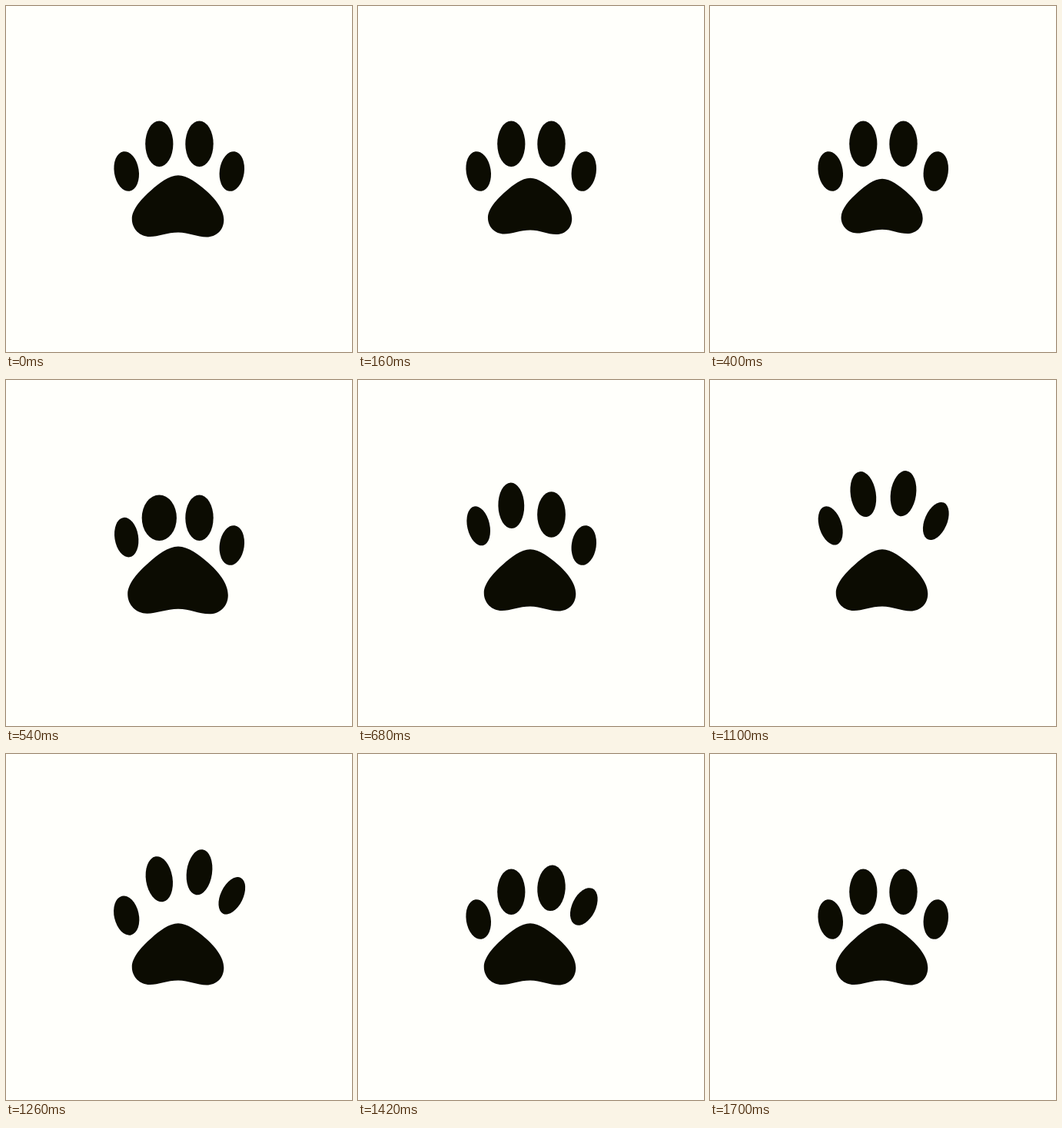
Recreate the animation shown at these times as an HTML page. Size 450 by 450 pixels, loop 1720 ms.

```html
<!DOCTYPE html>
<html>
<head>
<meta charset="utf-8">
<title>Paw</title>
<style>
  html, body { margin: 0; width: 100%; height: 100%; overflow: hidden; background: #fffffb; }
  svg { display: block; width: 100%; height: 100%; fill: #0c0c02; }
</style>
</head>
<body>
<svg id="stage" viewBox="0 0 450 450">
  <path id="pad" d="M224 220.3C236 220.3 249 230.5 259.5 239.5C271.5 250 283.3 264 283.3 278C283.3 292 273 300.5 261 300.5C248 300.5 238 294.5 224 294.5C210 294.5 198 300 187 300C174 300 163.8 290 163.8 277C163.8 264 177 250 189 239.5C199 230.5 212 220.3 224 220.3Z"/>
</svg>
<script>
const LOOP = 1720;
const stage = document.getElementById('stage');
const pad = document.getElementById('pad');

// tilt: resting angle, turn: extra angle while raised, squash: widest scale
const toes = [
  { x: 156.7, y: 215, rx: 16, ry: 26, tilt: -9, turn: -9, squash: 1.25 },
  { x: 199.3, y: 179.3, rx: 18.1, ry: 29.8, tilt: 0, turn: -9, squash: 1.25 },
  { x: 251.5, y: 179.3, rx: 18.2, ry: 29.8, tilt: 0, turn: 8, squash: 1.25 },
  { x: 293.8, y: 215, rx: 16, ry: 26, tilt: 8, turn: 18, squash: 1.35 }
];
for (const toe of toes) {
  toe.el = document.createElementNS('http://www.w3.org/2000/svg', 'ellipse');
  toe.el.setAttribute('rx', toe.rx);
  toe.el.setAttribute('ry', toe.ry);
  stage.append(toe.el);
}

const clamp = v => Math.min(1, Math.max(0, v));
const smooth = p => (1 - Math.cos(Math.PI * p)) / 2;

// Interpolates between [position, value] keys
function keyed(keys, k, ease = p => p) {
  if (k <= keys[0][0]) return keys[0][1];
  for (let i = 1; i < keys.length; i++) {
    const [a, from] = keys[i - 1], [b, to] = keys[i];
    if (k <= b) return from + (to - from) * ease((k - a) / (b - a));
  }
  return keys[keys.length - 1][1];
}

// The motion advances in steps lasting 20, 100 and 20 ms in turn
function stepAt(t) {
  const phase = t % 140;
  return 3 * Math.floor(t / 140) + (phase < 20 ? 0 : phase < 120 ? 1 : 2);
}

function lift(k) {
  const rise = Math.sin(Math.PI / 2 * clamp((k - 1.3) / 8));
  const fall = Math.cos(Math.PI / 2 * clamp((k - 11.8) / 8));
  return 31.6 * rise * fall;
}

function draw(step) {
  const s = keyed([[0, 1], [7, .86], [11.5, 1.1], [14, 1]], step, smooth);
  pad.setAttribute('transform', `translate(224 260) scale(${s}) translate(-224 -260)`);

  toes.forEach((toe, n) => {
    const k = step - 8 - 2 * n;
    const turn = toe.turn * keyed([[3, 0], [10, 1], [17, 1], [20.5, 0]], k);
    const width = keyed([[0, 1], [1, toe.squash], [2, 1.01], [3, .96], [5, .91],
      [15, .91], [19, 1], [20, toe.squash], [21, 1]], k);
    toe.el.setAttribute('transform',
      `translate(${toe.x} ${toe.y - lift(k)}) rotate(${toe.tilt + turn}) scale(${width} 1)`);
  });
}

const start = performance.now();
function tick() {
  draw(stepAt((performance.now() - start) % LOOP));
  requestAnimationFrame(tick);
}
tick();
</script>
</body>
</html>
```
